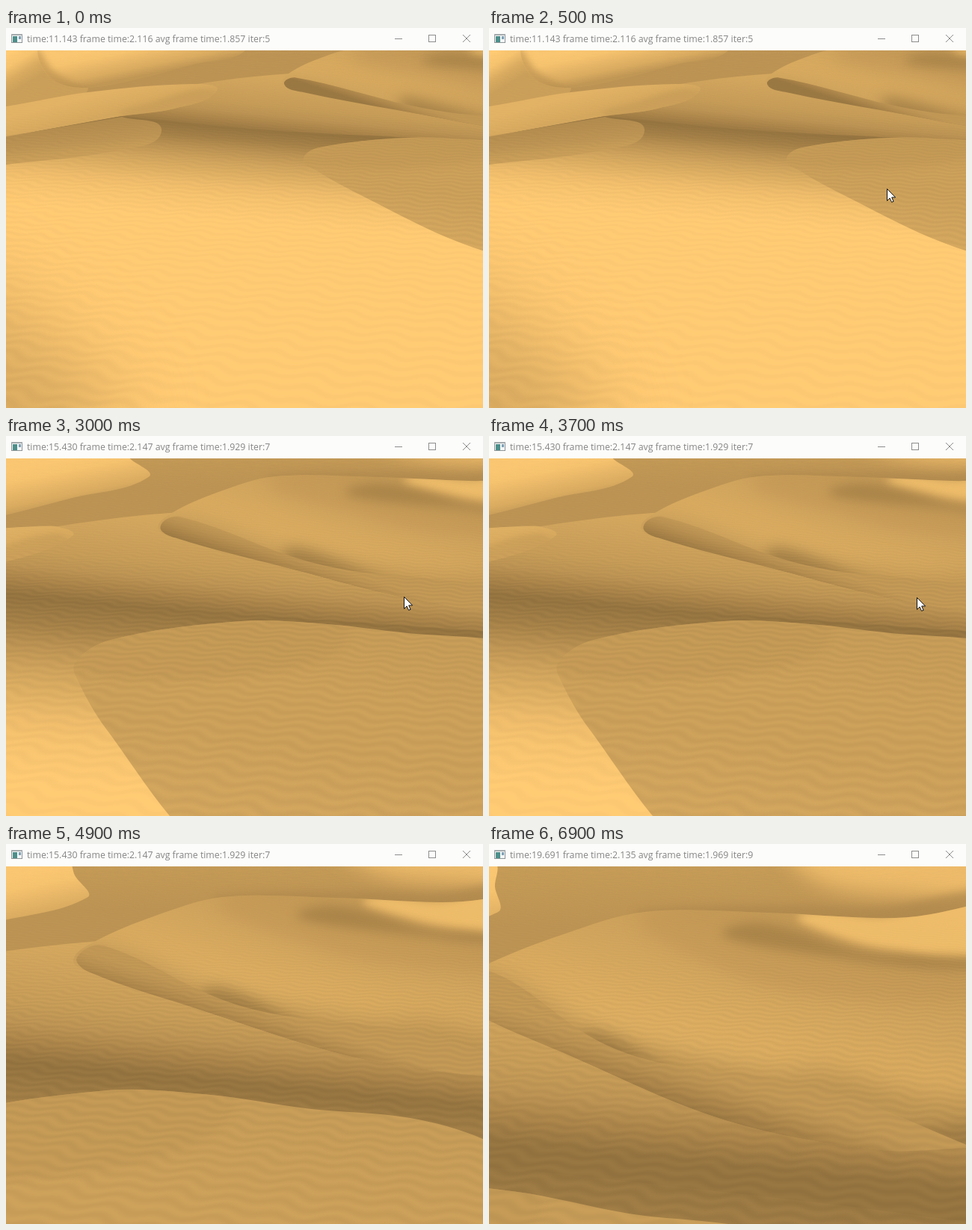
An HTML page with a canvas for the animation above (8000 ms loop, 638 by 509 pixels).

```html
<!DOCTYPE html>
<html>
<head>
<meta charset="utf-8">
<style>
html, body { margin: 0; width: 100%; height: 100%; overflow: hidden; }
#bar { position: absolute; width: 638px; height: 30px; background: #fcfcfa; }
#title { position: absolute; left: 28px; top: 6px; color: #858585; white-space: pre;
  font: 12.3px/18px "Open Sans", sans-serif; }
canvas, svg { position: absolute; left: 0; top: 0; }
</style>
</head>
<body>
<canvas id="view" width="638" height="509"></canvas>
<div id="bar"><span id="title"></span></div>
<svg width="638" height="509" fill="none">
  <g shape-rendering="crispEdges">
    <path d="M7.5 8.5h14v11h-14z" fill="#f4f6f6" stroke="#8d9496"/>
    <path d="M7 8h15v2h-15z" fill="#a5abad"/>
    <path d="M9 11h6v8h-6z" fill="#4d8f8b"/>
    <path d="M17 11h3v4h-3z" fill="#7f9fb5"/>
    <path d="M520 14.5h10M565.5 9.5h9v9h-9z" stroke="#8c8c8c"/>
  </g>
  <path d="M611 9l10 10M621 9l-10 10" stroke="#8c8c8c"/>
  <path id="cursor" d="M.5 .5V16.4L4.1 12.9 6.6 18.4 9.1 17.3 6.7 11.9H11.6Z" fill="#fff" stroke="#111"/>
</svg>
<script>
const W = 638, H = 509, BAR = 30;
const HEADING = [1170, -145];   // screen point the camera flies towards, on the horizon
const DARK = [135, 104, 57], LIGHT = [255, 202, 115];
let ctx, camera, last;

// Tones run from a (deep shadow) to z (full sun).
function tone(letter) {
  const k = (letter.charCodeAt(0) - 97) / 25;
  return `rgb(${DARK.map((d, i) => Math.round(d + (LIGHT[i] - d) * k))})`;
}

// Where a ground point seen at camera stop `from` appears at the present stop.
// Nearness grows with the distance below the horizon; `rate` allows for the dune's height.
function project([x, y], { from, rate }) {
  const [hx, hy] = HEADING;
  const depth = Math.max(.1, 1 - (camera - from) * rate * 1e-4 * (y - hy));
  return [hx + (x - hx) / depth, hy + (y - hy) / depth];
}

// Closed smooth curve through the projected points; a doubled point makes a corner.
function curve(text, plane) {
  const points = text.match(/\S+ \S+/g).map(p => project(p.split(' ').map(Number), plane));
  const path = new Path2D(), at = i => points.at(i % points.length);
  const direction = i => {
    const [ax, ay] = at(i - 1), [bx, by] = at(i + 1), len = Math.hypot(bx - ax, by - ay) || 1;
    return [(bx - ax) / len, (by - ay) / len];
  };
  path.moveTo(...at(0));
  points.forEach(([ax, ay], i) => {
    const [bx, by] = at(i + 1), [ux, uy] = direction(i), [vx, vy] = direction(i + 1);
    const r = Math.hypot(bx - ax, by - ay) / 3;
    path.bezierCurveTo(ax + ux * r, ay + uy * r, bx - vx * r, by - vy * r, bx, by);
  });
  return path;
}

// The tones spread from y0 to y1 at x, along lines of the given slope.
function dune(from, rate, points, [x, y0, y1, slope], tones) {
  const plane = { from, rate };
  const [ax, ay] = project([x, y0], plane), [, by] = project([x, y1], plane);
  const t = (by - ay) / (1 + slope * slope);
  const g = ctx.createLinearGradient(ax, ay, ax - slope * t, ay + t);
  [...tones].forEach((c, i) => g.addColorStop(i / (tones.length - 1), tone(c)));
  last = { plane, shape: curve(points, plane) };
  ctx.fillStyle = g;
  ctx.fill(last.shape);
}

// Blurred shade kept inside the dune drawn before it.
function shade(points, letter, blur, alpha) {
  ctx.save();
  ctx.clip(last.shape);
  ctx.filter = `blur(${blur}px)`;
  ctx.globalAlpha = alpha;
  ctx.fillStyle = tone(letter);
  ctx.fill(curve(points, last.plane));
  ctx.restore();
}

function desert() {
  // far sand and its sunny crest
  dune(4, 3.9, '-3000 -100 2000 -100 2000 700 -3000 700', [300, 30, 110, 0], 'nml');
  shade('400 0 700 0 720 66 560 68 440 50', 'w', 14, .9);
  shade('200 90 420 82 530 84 690 62 690 110 200 110', 'i', 6, .7);

  // far left dunes
  dune(0, 3.87, '-60 -40 20 0 42 30 62 69 110 80 60 95 -60 125', [10, 30, 85, -.6], 'zxro');
  dune(0, 3.87, '60 -20 42 30 62 69 108 80 170 70 250 49 322 28 285 9 250 -10', [190, 15, 62, -.2], 'yxurm');
  shade('38 30 60 74 108 84 88 72 64 58', 'j', 4, .6);

  // valley floor
  dune(2, 4.1, '-300 215 0 135 95 117 220 103 400 95 1000 150 1000 330 -300 240', [150, 105, 226, .1], 'qponlhd');

  // great right dune: face, sunny notch, shadow under the crease
  dune(3, 3.9, '90 155 120 130 200 96 290 71 440 72 580 78 638 74 760 50 1050 40 1050 300 740 309 638 311 460 284 260 222 110 171',
    [440, 75, 270, .3], 'nopqrsr');
  shade('290 72 400 132 520 160 710 160 710 110 500 78', 'm', 10, .6);
  shade('480 74 580 76 700 60 710 118 610 114 530 98', 'x', 6, .85);
  shade('400 88 560 124 710 134 710 122 580 117', 'g', 7, .8);
  shade('60 145 130 136 280 196 490 236 560 236 700 262 1050 250 1050 340 460 300', 'j', 16, .75);
  shade('260 215 460 268 640 290 1050 280 1050 350 460 310', 'd', 9, .7);
  dune(3, 3.9, '95 152 130 136 280 205 360 228 490 243 590 262 740 309 740 309 638 311 460 284 260 222 110 171',
    [300, 208, 250, .33], 'mkhe');

  // low left dune
  dune(0, 3.9, '-60 112 0 105 110 86 250 75 282 84 225 108 155 118 0 146 -60 158', [140, 85, 125, -.25], 'tsrqq');
  shade('262 82 200 99 155 118 225 112 290 95', 'm', 3, .5);

  // sunny foreground
  dune(0, 4.2, '-60 150 0 145 155 118 155 118 350 137 638 151 900 165 1100 180 1100 900 -900 900',
    [338, 136, 262, .08], 'dglpsvxyz');
  shade('-100 340 40 400 150 560 -100 620', 'o', 55, .7);
  dune(0, 4.8, '-60 158 0 146 155 119 155 119 208 138 150 164 0 183 -60 190', [80, 130, 178, -.1], 'jklno');

  // near shadowed dune
  dune(1, 4.4, '270 230 300 208 440 190 540 193 638 202 736 208 809 221 1100 300 1100 560 720 475 638 450 480 392 330 288 285 250',
    [500, 195, 400, .15], 'noopq');
  shade('262 230 300 205 440 184 560 194 555 222 470 241 380 246 290 241', 'm', 4, .65);
}

// Wind ripples: even waves lying on the ground that the camera flies over.
function ripple() {
  const img = ctx.getImageData(0, BAR, W, H - BAR), px = img.data;
  const [hx, hy] = HEADING;
  for (let y = 0, i = 0; y < H - BAR; y++) {
    const near = y + BAR - hy, row = 27900 / near + 11.7 * camera;
    const fade = Math.min(1, Math.max(.25, (near * near / 27900 - 1.5) / 3));
    for (let x = 0; x < W; x++, i += 4) {
      const u = (x - hx) / near;
      const phase = row + 4.6 * u + .22 * Math.sin(51 * u + row * .8) + .15 * Math.sin(23 * u - row * .5);
      const gain = 1 + fade * (.045 - .00013 * px[i]) * Math.sin(phase * 2 * Math.PI);
      for (let c = 0; c < 3; c++) px[i + c] *= gain;
    }
  }
  ctx.putImageData(img, 0, BAR);
}

function picture(stop) {
  const canvas = Object.assign(document.createElement('canvas'), { width: W, height: H });
  ctx = canvas.getContext('2d');
  camera = stop;
  desert();
  ripple();
  return canvas;
}

const titles = [
  [0, '11.143', '2.116', '1.857'], [1000, '13.282', '2.140', '1.897'], [3000, '15.430', '2.147', '1.929'],
  [5000, '17.556', '2.127', '1.951'], [6900, '19.691', '2.135', '1.969']
].map(([at, time, frame, avg], i) => [at, `time:${time} frame time:${frame} avg frame time:${avg} iter:${i + 5}`]);
const cuts = [0, 1000, 3000, 4900, 6900].map((at, stop) => [at, picture(stop)]);
const pointer = [[0], [400, 591, 119], [500, 532, 215], [3700, 572, 216], [3800, 607, 221], [4300, 614, 191], [4400]];
const current = (steps, t) => steps.filter(s => s[0] <= t).pop();

const $ = id => document.getElementById(id);
const view = $('view').getContext('2d');

function render(now) {
  const t = now % 8000, [, x, y] = current(pointer, t);
  view.drawImage(current(cuts, t)[1], 0, 0);
  $('title').textContent = current(titles, t)[1];
  $('cursor').setAttribute('visibility', x ? 'visible' : 'hidden');
  if (x) $('cursor').setAttribute('transform', `translate(${x} ${y})`);
}

const start = performance.now();
function tick() {
  render(performance.now() - start);
  requestAnimationFrame(tick);
}
tick();
</script>
</body>
</html>
```
